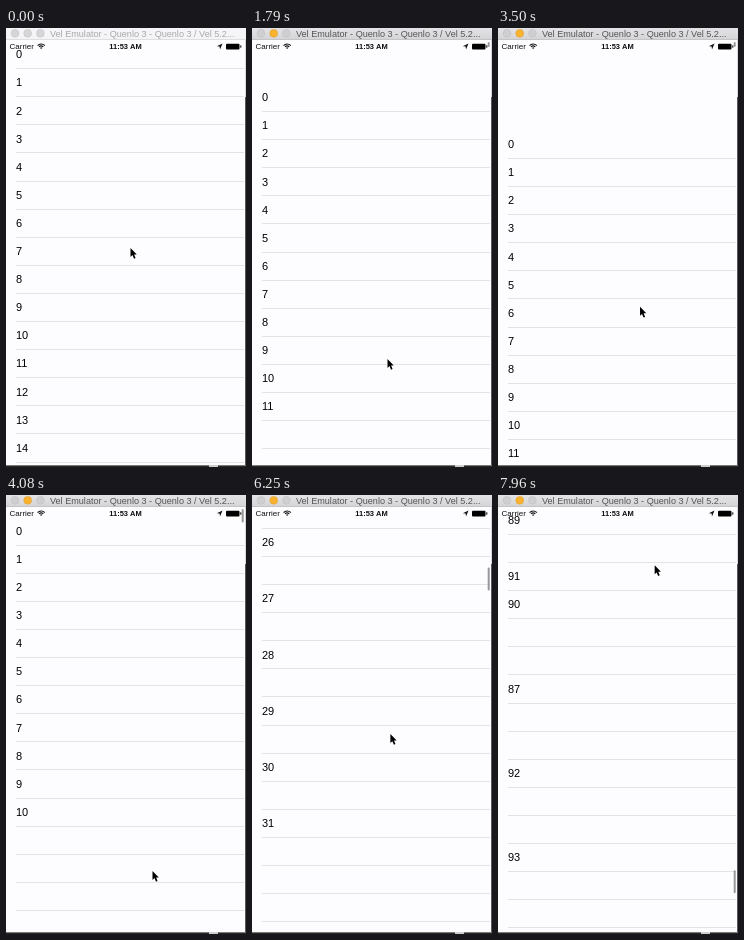
Animation of 240 by 439 pixels, one loop 8 s. Source, as an HTML page with a canvas:

```html
<!DOCTYPE html>
<html lang="en">
<head>
<meta charset="utf-8">
<title>List scrolling</title>
<style>
  html, body { margin: 0; width: 100%; height: 100%; overflow: hidden; background: #fdfcfe; }
  canvas { display: block; width: 240px; height: 439px; }
</style>
</head>
<body>
<canvas id="stage" width="240" height="439"></canvas>
<script>
const ctx = document.getElementById('stage').getContext('2d');
const LOOP = 8000, STEP = 1000 / 24;
const W = 240, H = 439, TOP = 12, ROW = 28.1, VIEW = H - TOP, ROWS = 256;
const FLICK_START = 5250;
const SANS = '"Liberation Sans", Arial, sans-serif';

const clamp = (v, a = 0, b = 1) => Math.min(b, Math.max(a, v));
const lerp = (a, b, p) => a + (b - a) * p;
const smooth = p => p * p * (3 - 2 * p);
const rubber = d => VIEW * (1 - 1 / (d * 0.55 / VIEW + 1));

// Pointer moves: start, end, and the point reached; it rests in between
const moves = [
  [290, 750, 134, 45],
  [1040, 1597, 135, 331],
  [1830, 2590, 135, 75],
  [2700, 2800, 132, 72],
  [3170, 3700, 146, 376],
  [4120, 5080, 129, 413],
  [FLICK_START, 5950, 172, 14],
  [5950, 6480, 115, 390],
  [6480, 7142, 87, 14],
  [7142, 7560, 140, 390],
  [7560, 8087, 159, 14]
];

function pointerAt(t) {
  let x = 124, y = 220;
  for (const [start, end, toX, toY] of moves) {
    const p = smooth(clamp((t - start) / (end - start)));
    x = lerp(x, toX, p);
    y = lerp(y, toY, p);
  }
  return [x, y];
}

// The two drags that pull the list below its top edge
const pulls = [moves[1], moves[4]].map(([start, release, , y]) => {
  const y0 = pointerAt(start)[1], max = rubber(y - y0);
  return { start, release, y0, max, firstLost: Math.ceil((VIEW - max) / ROW) };
});

// Scroll offsets reached by the upward flicks
const flicks = [[FLICK_START, 0], [5583, 441], [6042, 760], [6875, 1684], [7958, 6127]];

function flickOffset(t) {
  const i = Math.max(1, flicks.findIndex(k => k[0] >= t));
  const [t0, a] = flicks[i - 1], [t1, b] = flicks[i];
  return lerp(a, b, (t - t0) / (t1 - t0));
}

function scrollState(t) {
  if (t >= FLICK_START) return { offset: flickOffset(Math.min(t, 7958)), bar: 1 };
  const pull = pulls.filter(p => t >= p.start).pop();
  if (!pull) return { offset: 0, bar: 0 };
  if (t < pull.release) {
    return { offset: -rubber(pointerAt(t)[1] - pull.y0), bar: clamp((t - pull.start) / 80) };
  }
  const since = t - pull.release, wt = since * 0.0109;
  return {
    offset: -pull.max * (1 + wt) * Math.exp(-wt),
    bar: 1 - clamp((since - 600) / 250),
    firstLost: pull.firstLost,
    refill: clamp((since - 1110) / 130)
  };
}

// Cells that load out of order, by their first row
const shuffled = {
  60: '39 40 41 38 43 44 - 45 - - 42'.split(' '),
  218: '89 - 91 90 - - 87 - - 92 - - 93'.split(' ')
};

// Elsewhere labels count up more slowly than rows, leaving empty cells
const loadCount = row => Math.floor(row < 75 ? 15 + (row - 15) * 0.53 : 46 + (row - 76) * 0.29);

function labelFor(row, y, t) {
  if (row < 15) return row;
  if (t < 5800 || y > 370) return '';
  for (const first in shuffled) {
    const label = shuffled[first][row - first];
    if (label) return label === '-' ? '' : label;
  }
  const count = loadCount(row);
  return row < 60 || (row > 75 && row < 218) ? (count > loadCount(row - 1) ? count : '') : '';
}

function rect(x, y, w, h, color) {
  ctx.fillStyle = color;
  ctx.fillRect(x, y, w, h);
}

function pill(x, y, w, h, color) {
  ctx.beginPath();
  ctx.roundRect(x, y, w, h, 1);
  ctx.fillStyle = color;
  ctx.fill();
}

function text(str, x, y, font, color, align = 'left') {
  ctx.font = font + ' ' + SANS;
  ctx.fillStyle = color;
  ctx.textAlign = align;
  ctx.fillText(str, x, y);
}

function poly(points, fill, stroke) {
  ctx.beginPath();
  points.forEach(([x, y]) => ctx.lineTo(x, y));
  ctx.closePath();
  if (stroke) {
    ctx.strokeStyle = stroke;
    ctx.lineWidth = 1.4;
    ctx.stroke();
  }
  ctx.fillStyle = fill;
  ctx.fill();
}

function drawRows(t, { offset, firstLost = ROWS, refill = 1 }) {
  const first = Math.max(0, Math.floor(offset / ROW));
  for (let r = first; r < Math.min(first + 17, ROWS); r++) {
    const y = TOP + r * ROW - offset;
    rect(10, Math.round(y + ROW), 228, 1, '#e3e2e5');
    ctx.globalAlpha = r >= firstLost ? refill : 1;
    text(labelFor(r, y + ROW / 2, t), 10, Math.round(y + 18.3), '11px', '#000');
    ctx.globalAlpha = 1;
  }
}

function drawScrollBar({ offset, bar }) {
  const travel = clamp(offset / (ROWS * ROW - VIEW)) * 399;
  const height = Math.max(5, 23 + Math.min(0, offset));
  ctx.globalAlpha = bar;
  pill(235.7, 14 + travel, 2, height, '#98979a');
  ctx.globalAlpha = 1;
}

function drawStatusBar() {
  text('Carrier', 3.5, 21, '8px', '#111');
  ctx.strokeStyle = '#111';
  ctx.lineWidth = 1.1;
  for (const radius of [1, 3, 5]) {
    ctx.beginPath();
    ctx.arc(35.2, 21, radius, -Math.PI * 0.76, -Math.PI * 0.24);
    ctx.stroke();
  }
  text('11:53 AM', 119.5, 21, 'bold 7.5px', '#111', 'center');
  poly([[216.5, 15.5], [214, 21.5], [213.6, 18.6], [210.8, 18.2]], '#111');
  pill(220, 15.8, 13.5, 5.6, '#000');
  rect(234.3, 17.3, 1, 2.4, '#000');
}

function drawTitleBar(active) {
  const shade = ctx.createLinearGradient(0, 0, 0, 11);
  shade.addColorStop(0, active ? '#e4e3e5' : '#f6f5f7');
  shade.addColorStop(1, active ? '#d5d4d6' : '#f4f3f5');
  rect(0, 0, W, 11, shade);
  rect(0, 11, W, 1, active ? '#c4c3c5' : '#dedde0');
  for (let i = 0; i < 3; i++) {
    const lit = active && i === 1;
    ctx.beginPath();
    ctx.arc(9 + i * 12.7, 5.3, 3.9, 0, 7);
    ctx.fillStyle = lit ? '#f9b32f' : active ? '#cfced0' : '#d6d5d7';
    ctx.fill();
    ctx.strokeStyle = lit ? '#dd9a28' : '#bdbcbe';
    ctx.lineWidth = 0.5;
    ctx.stroke();
  }
  text('Vel Emulator - Quenlo 3 - Quenlo 3 / Vel 5.2...', 44, 8.7, '9.1px',
    active ? '#555457' : '#a9a8ab');
}

function drawWindowEdge() {
  rect(239, 12, 1, 57, '#d8d8da');
  rect(239, 69, 1, 370, '#59595c');
  rect(0, 437, W, 1, '#777a76');
  rect(0, 438, W, 1, '#252a25');
  rect(203, 437, 9, 2, '#cfcfcf');
}

function drawPointer([x, y]) {
  const arrow = [[0, 0], [0, 10], [2.3, 7.9], [4.1, 12], [5.9, 11.2], [4.2, 7.3], [7.3, 7.2]];
  ctx.save();
  ctx.translate(x + 0.5, y);
  ctx.scale(0.86, 0.9);
  poly(arrow, '#000', '#fff');
  ctx.restore();
}

function draw(t) {
  const state = scrollState(t);
  rect(0, 0, W, H, '#fdfcfe');
  drawRows(t, state);
  drawScrollBar(state);
  drawStatusBar();
  drawTitleBar(t >= 1040);
  drawWindowEdge();
  drawPointer(pointerAt(t));
}

function tick() {
  draw(Math.floor((performance.now() % LOOP + 5) / STEP) * STEP);
  requestAnimationFrame(tick);
}
tick();
</script>
</body>
</html>
```
